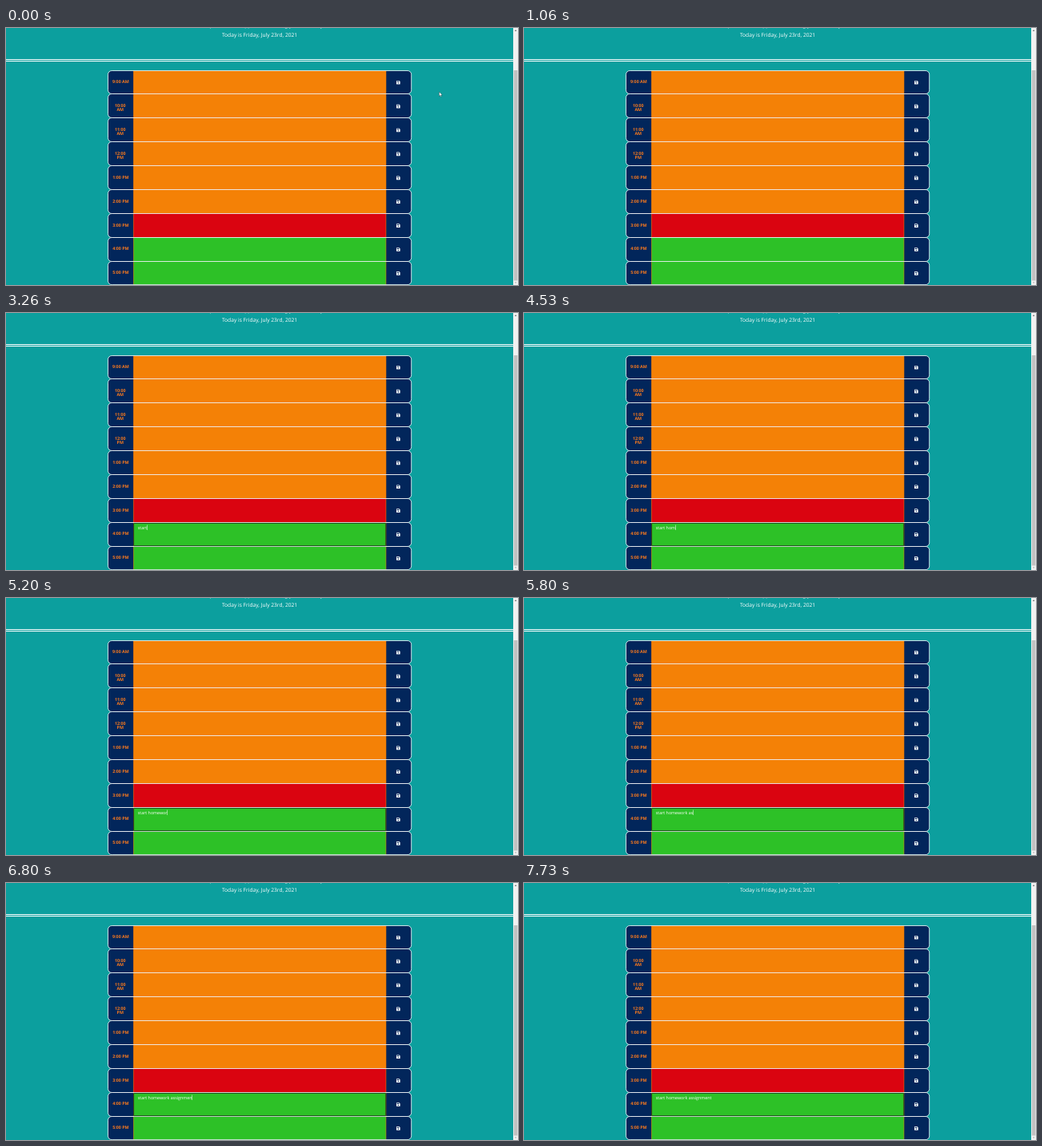
Recreate the animation shown at these times as an HTML page. Size 640x322 px, loop 8 s.

```html
<!DOCTYPE html>
<html lang="en">
<head>
<meta charset="utf-8">
<title>Work day scheduler</title>
<style>
  html, body { margin: 0; width: 100%; height: 100%; overflow: hidden; background: #0c9f9e; }
  svg { display: block; width: 100%; height: 100%; }
  text { font-family: "Open Sans", sans-serif; fill: #fff; white-space: pre; text-rendering: geometricPrecision; }
  .lead { font-size: 6.667px; text-anchor: middle; }
  .hour { font-size: 5.333px; font-weight: 700; text-anchor: middle; fill: #fb7a1e; }
  .entry { font-size: 5.333px; }
</style>
</head>
<body>
<svg viewBox="0 0 640 322" xmlns="http://www.w3.org/2000/svg">
  <defs>
    <g id="save">
      <path fill="#fff" d="M.5 0H3.5L4.67 1.2V4.17a.5.5 0 0 1-.5.5H.5a.5.5 0 0 1-.5-.5V.5A.5.5 0 0 1 .5 0Z"/>
      <path fill="#02265b" d="M.7.7H3.3V1.8H.7Z"/>
      <circle cx="2.33" cy="3.2" r=".68" fill="#02265b"/>
    </g>
  </defs>
  <rect width="640" height="322" fill="#0c9f9e"/>
  <text class="lead" x="317" y="-.7">A simple calendar app for scheduling your workday</text>
  <text class="lead" x="317" y="11.4">Today is Friday, July 23rd, 2021</text>
  <path d="M0 39.5H634M0 41.5H634" stroke="#fff"/>
  <g id="rows"></g>
  <rect id="focus" x="159.6" y="263.4" width="315.2" height="28.3" rx=".5" fill="none" stroke="#151c14" stroke-width=".75"/>
  <text id="entry" class="entry" x="164.8" y="270.7"></text>
  <rect id="caret" y="265.6" width=".5" height="6.4" fill="#fff"/>
  <g id="scrollbar">
    <rect x="634" width="6" height="322" fill="#f1f1f1"/>
    <rect x="634.8" y="53" width="4.6" height="263.5" fill="#c1c1c1"/>
    <path d="M635.8 3.7L637.1 2.2L638.4 3.7Z" fill="#505050"/>
    <path d="M635.8 318.4L637.1 319.9L638.4 318.4Z" fill="#a3a3a3"/>
  </g>
  <path id="mouse" d="M0 0V5.4L1.25 4.3L2.1 6.2L2.9 5.8L2.1 4H3.8Z" fill="#fff" stroke="#111" stroke-width=".3"/>
</svg>
<script>
const LOOP = 8000;
const BLINK = 530;
const FOCUS_AT = 1460;
const NOTE = "start homework assignment";

// [time, number of typed characters]
const TYPING = [
  [2730, 1], [2800, 2], [3060, 3], [3260, 5], [3400, 6], [3600, 7], [3800, 8],
  [4530, 9], [4660, 10], [4800, 11], [5000, 12], [5200, 13], [5330, 14],
  [5400, 15], [5600, 16], [5800, 17], [5930, 18], [6060, 19], [6200, 20],
  [6330, 21], [6530, 22], [6660, 23], [6800, 24], [6930, 25]
];

// [time, x, y]; the pointer is hidden over the text fields
const POINTER = [[0, 541.5, 80], [660, 517, 150], [800, -20, -20]];

const ROW = { left: 127.5, top: 53, width: 379.2, pitch: 29.9 };
const FIELD = { left: 159.3, width: 315.8 };
const COLORS = { past: "#f48106", present: "#da0410", future: "#2dc127" };
const HOURS = ["9:00 AM", "10:00 AM", "11:00 AM", "12:00 PM", "1:00 PM",
  "2:00 PM", "3:00 PM", "4:00 PM", "5:00 PM"];

const $ = id => document.getElementById(id);

function add(tag, attrs, content = "") {
  const node = document.createElementNS("http://www.w3.org/2000/svg", tag);
  for (const key in attrs) node.setAttribute(key, attrs[key]);
  node.textContent = content;
  $("rows").append(node);
}

// Row borders sit on whole pixels, so neighbours share one thin line
const rowEdge = i => Math.floor(ROW.top + i * ROW.pitch) + .5;

function drawRow(label, i) {
  const y = ROW.top + i * ROW.pitch;
  const top = rowEdge(i);
  const height = Math.min(rowEdge(i + 1), 321.6) - top;
  const state = i < 6 ? "past" : i === 6 ? "present" : "future";
  const frame = { x: ROW.left, y: top, width: ROW.width, height, rx: 4.7 };
  const right = FIELD.left + FIELD.width;

  add("rect", { ...frame, fill: "#02265b" });
  add("rect", { x: FIELD.left, y: top, width: FIELD.width, height, fill: COLORS[state] });
  add("path", {
    d: `M${FIELD.left + .2} ${top}v${height}M${right - .2} ${top}v${height}`,
    stroke: "#f48106", "stroke-width": .5
  });
  add("rect", { ...frame, fill: "none", stroke: "#fff", "stroke-width": .8 });

  const lines = label.length > 7 ? label.split(" ") : [label];
  lines.forEach((line, n) => add("text", {
    class: "hour", x: lines.length > 1 ? 142.8 : 143.4,
    y: y + 16.1 + n * 5.35
  }, line));
  add("use", { href: "#save", x: 488, y: y + 12.9 });
}

const latest = (steps, t) => steps.filter(step => step[0] <= t).pop();

function render(t) {
  const [keyTime, count] = latest(TYPING, t) || [FOCUS_AT, 0];
  const focused = t >= FOCUS_AT;
  const caretOn = focused && Math.floor((t - keyTime) / BLINK) % 2 === 0;
  const [, x, y] = latest(POINTER, t);

  $("entry").textContent = NOTE.slice(0, count);
  $("caret").setAttribute("x", 164.8 + (count ? $("entry").getComputedTextLength() : 0));
  $("caret").setAttribute("visibility", caretOn ? "visible" : "hidden");
  $("focus").setAttribute("visibility", focused ? "visible" : "hidden");
  $("mouse").setAttribute("transform", `translate(${x} ${y})`);
}

HOURS.forEach(drawRow);
const start = performance.now();
function tick() {
  render((performance.now() - start) % LOOP);
  requestAnimationFrame(tick);
}
tick();
</script>
</body>
</html>
```
